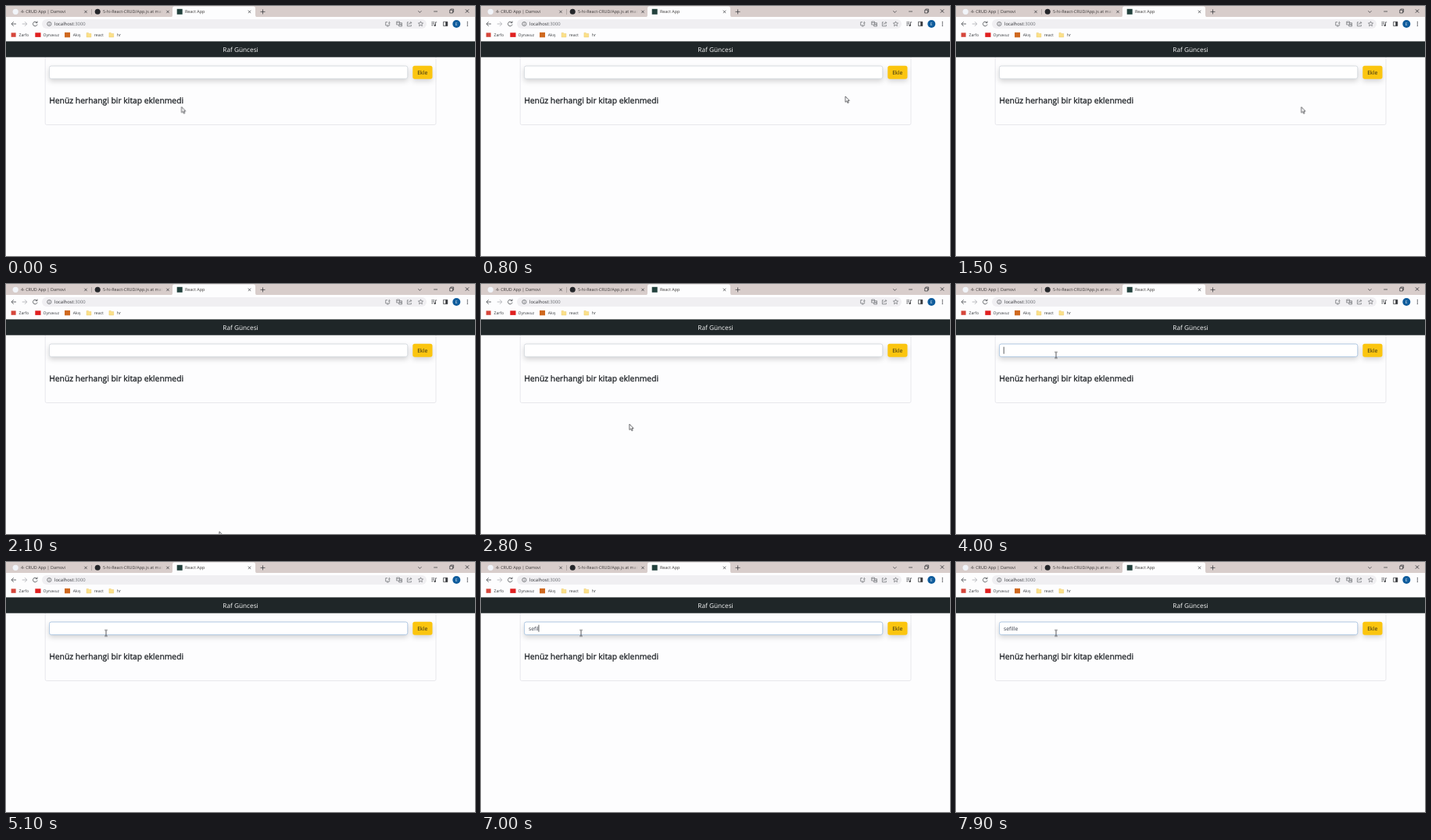
Animation, 600 px wide and 321 px high, one loop 8000 ms. Source, as an HTML page:

```html
<!DOCTYPE html>
<html lang="tr">
<head>
<meta charset="utf-8">
<title>React App</title>
<style>
  html, body { margin: 0; width: 100%; height: 100%; overflow: hidden; background: #fdfdfe; }
  svg { display: block; width: 600px; height: 321px; }
  text {
    font-family: "Open Sans", "Noto Sans", sans-serif;
    text-rendering: geometricPrecision;
    white-space: pre;
  }
  .tab { font-size: 5.4px; fill: #3b3838; }
  .mark { font-size: 5.1px; fill: #33363a; }
  .line { fill: none; stroke: #55585c; stroke-width: .9; }
  .thin { stroke-width: .7; stroke: #303236; }
  .soft { stroke-width: .7; stroke: #66696e; }
  .heading { font-size: 10.34px; fill: #212529; stroke: #212529; stroke-width: .32; }
  .raised { filter: drop-shadow(0 3.2px 3px rgba(0, 0, 0, .16)); }

  #field { animation: focus 8s linear infinite; }
  #mouse { animation: move 8s linear infinite; }
  #arrow { animation: arrow 8s step-end infinite; }
  #beam { animation: beam 8s step-end infinite; }

  @keyframes focus {
    0%, 43.125% { stroke: #ced4da; }
    45%, 100% { stroke: #9dbbdc; }
  }
  @keyframes move {
    0% { transform: translate(224.5px, 129.5px); }
    1% { transform: translate(226px, 129.5px); }
    5% { transform: translate(345px, 124px); }
    10% { transform: translate(466.3px, 116px); }
    11.25% { transform: translate(455px, 118px); }
    15%, 18.5% { transform: translate(448px, 121px); }
    22.5% { transform: translate(352px, 252px); }
    26.25% { transform: translate(273px, 318px); }
    28.75% { transform: translate(258px, 276px); }
    35% { transform: translate(190px, 180px); }
    40% { transform: translate(140px, 108px); }
    42.5%, 100% { transform: translate(128px, 91.3px); }
  }
  @keyframes arrow { 0% { visibility: visible; } 41.5%, 100% { visibility: hidden; } }
  @keyframes beam { 0% { visibility: hidden; } 41.5%, 100% { visibility: visible; } }
</style>
</head>
<body>
<svg viewBox="0 0 600 321">
  <defs>
    <path id="x" d="M-1.7-1.7 1.7 1.7M1.7-1.7-1.7 1.7"/>
    <path id="folder" d="M-2.9-2.8h2.3l.8 1h2.7v4.6h-5.8z" fill="#fbe089" stroke="#e6bf5a" stroke-width=".4"/>
    <linearGradient id="fade" gradientUnits="userSpaceOnUse" x1="192" x2="201">
      <stop stop-color="#3b3838"/>
      <stop offset="1" stop-color="#3b3838" stop-opacity="0"/>
    </linearGradient>
    <clipPath id="tabClip"><rect x="120" width="80" height="14"/></clipPath>
  </defs>

  <!-- Tab strip -->
  <rect width="600" height="15" fill="#d8cdcb"/>
  <path d="M210 14.5q3 0 3-3V3q0-2.5 2.5-2.5h101Q319 .5 319 3v8.5q0 3 3 3z" fill="#fdfdfe"/>
  <path d="M109.5 4v7" stroke="#a39a99" stroke-width=".7"/>
  <circle cx="12.2" cy="7.3" r="3.6" fill="#f1f4f9"/>
  <circle cx="117.2" cy="7.3" r="3.5" fill="#24262a"/>
  <rect x="218.7" y="3.8" width="7" height="7" fill="#23423e"/>
  <text class="tab" x="19" y="9.3">4- CRUD App | Damovi</text>
  <text class="tab" x="124" y="9.3" clip-path="url(#tabClip)" style="fill:url(#fade)">5-hi-React-CRUD/App.js at main</text>
  <text class="tab" x="229" y="9.3">React App</text>
  <g class="line thin">
    <use href="#x" x="102" y="7.4"/>
    <use href="#x" x="207" y="7.4"/>
    <use href="#x" x="311.5" y="7.4"/>
    <path d="M325.5 7.4h6M328.5 4.4v6"/>
    <path d="M527.3 6.3l2.1 2.1 2.1-2.1M547.2 7h4.8"/>
    <path d="M567.7 5.2h3.8v3.8h-3.8zM568.8 5.2v-1.2h3.8v3.8h-1.1"/>
    <use href="#x" transform="translate(590 6.5) scale(1.25)"/>
  </g>

  <!-- Toolbar -->
  <rect y="14" width="600" height="31.5" fill="#fdfdfe"/>
  <rect x="46" y="17" width="492" height="12" rx="6" fill="#f0eff2"/>
  <g class="line">
    <path d="M13 23H7M9.7 20.2 6.9 23l2.8 2.8"/>
    <path d="M20.7 23h6M24 20.2l2.8 2.8-2.8 2.8" stroke="#b3b4b8"/>
    <path d="M39.4 21.2a2.8 2.8 0 1 0 .6 2.4M40 19.5v2.1h-2.2"/>
    <circle cx="55.3" cy="23" r="2.6" stroke-width=".7"/>
    <path d="M55.3 22.6v1.9M55.3 21.2v.7" stroke-width=".7"/>
  </g>
  <text x="62" y="25.2" font-size="5.9" fill="#303236">localhost<tspan fill="#6c6f74">:3000</tspan></text>
  <g class="line soft">
    <path d="M488 20.7h-2.3v4.2h5v-1.4M487 26h2.6M490.3 19.8v2.7M489 21.6l1.3 1.2 1.3-1.2"/>
    <path d="M499.7 20h3.8v4h-3.8zM503.5 21.7h3v4.3h-3.8v-2M500.5 21.5h2M504.2 24.7l.8-1.8.8 1.8"/>
    <path d="M515 20.8h-1.6v5h5v-1.6M515.2 24c.2-1.8 1.2-2.5 3.4-2.5M517.2 19.8l1.7 1.7-1.7 1.7"/>
    <path d="M530.5 19.8l.9 2 2.2.2-1.7 1.5.5 2.2-1.9-1.2-1.9 1.2.5-2.2-1.7-1.5 2.2-.2z"/>
  </g>
  <g class="line thin">
    <path d="M544.3 20.8h4M544.3 22.8h4M544.3 24.8h2.2M549.5 24.8v-4h1.7"/>
    <circle cx="548.7" cy="24.9" r=".8" fill="#303236"/>
    <path d="M559.5 20.3h5.3v5.3h-5.3z"/>
  </g>
  <path d="M562.3 20.3h2.5v5.3h-2.5z" fill="#303236"/>
  <circle cx="576.3" cy="23" r="5" fill="#0f5c9c"/>
  <text x="576.3" y="25" font-size="5.2" fill="#e8f1fa" text-anchor="middle">E</text>
  <g fill="#404348">
    <circle cx="590.4" cy="20.7" r=".75"/>
    <circle cx="590.4" cy="23" r=".75"/>
    <circle cx="590.4" cy="25.3" r=".75"/>
  </g>

  <!-- Bookmarks -->
  <rect x="6.6" y="34.4" width="6" height="5.4" fill="#d5463b"/>
  <rect x="37.3" y="34.3" width="7.2" height="5.6" fill="#e02020"/>
  <rect x="75" y="33.9" width="7" height="6.4" fill="#cf691f"/>
  <use href="#folder" x="106" y="37.2"/>
  <use href="#folder" x="134.8" y="37.2"/>
  <text class="mark" x="16.5" y="39">Zarfo</text>
  <text class="mark" x="47.5" y="39">Oynavuz</text>
  <text class="mark" x="85.8" y="39">Akış</text>
  <text class="mark" x="112.8" y="39">react</text>
  <text class="mark" x="141.8" y="39">hr</text>

  <!-- Page -->
  <path d="M50.2 60v90.5q0 2 2 2H548q2 0 2-2V60" fill="#fdfdfe" stroke="#e2e3e8" stroke-width=".8"/>
  <rect y="45.4" width="600" height="20.3" fill="#1f2628"/>
  <text x="300" y="59" font-size="8.25" fill="#f7f8f8" text-anchor="middle">Raf Güncesi</text>
  <g class="raised">
    <rect id="field" x="55.4" y="77" width="458.4" height="16.4" rx="2.5" fill="#fff" stroke-width=".8"/>
  </g>
  <g class="raised">
    <rect x="520.3" y="76.7" width="25.2" height="17" rx="2.6" fill="#fbc50f"/>
  </g>
  <text x="532.8" y="87.8" font-size="6.9" fill="#2b2714" text-anchor="middle">Ekle</text>
  <text id="typed" x="61" y="87.8" font-size="6.75" fill="#343a48"></text>
  <path id="caret" d="M0 80.7v9" stroke="#33373c" stroke-width=".8"/>
  <text class="heading" x="55.2" y="125">Henüz herhangi bir kitap eklenmedi</text>

  <g id="mouse">
    <path id="arrow" d="M0 0v7.4l1.7-1.5 1.3 2.7 1.2-.6-1.2-2.6h2.2z" fill="#fff" stroke="#26282c" stroke-width=".7"/>
    <path id="beam" d="M-1.8-3.8H-.5L0-3.4.5-3.8H1.8M0-3.4V3.4M-1.8 3.8H-.5L0 3.4.5 3.8H1.8" fill="none" stroke="#303236" stroke-width=".8"/>
  </g>
</svg>
<script>
  const LOOP = 8000, CLICK = 3450, RELEASE = 3550, BLINK = 500;
  const word = "sefille";
  const keyTimes = [5950, 6150, 6450, 6650, 6950, 7150, 7350];
  const typed = document.getElementById("typed");
  const caret = document.getElementById("caret");
  const clock = document.getElementById("mouse").getAnimations()[0];

  // The blink restarts on mouse release and on each key press.
  function caretOn(t, count) {
    if (t < CLICK) return false;
    const start = count ? keyTimes[count - 1] : RELEASE;
    return Math.floor(Math.max(0, t - start) / BLINK) % 2 === 0;
  }

  function draw() {
    const now = clock ? clock.currentTime ?? 0 : performance.now();
    const t = Number(now) % LOOP;
    const count = keyTimes.filter(k => k <= t).length;
    const text = word.slice(0, count);
    if (typed.textContent !== text) typed.textContent = text;
    const x = 61.2 + (count ? typed.getComputedTextLength() : 0);
    caret.setAttribute("transform", `translate(${x} 0)`);
    caret.setAttribute("visibility", caretOn(t, count) ? "visible" : "hidden");
    requestAnimationFrame(draw);
  }
  draw();
</script>
</body>
</html>
```
